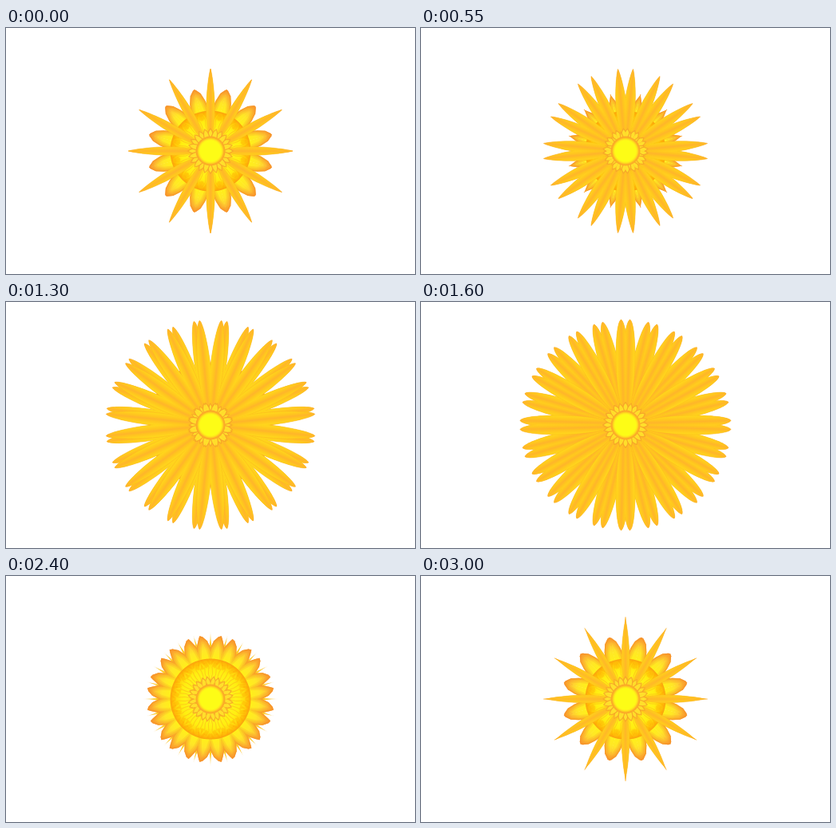
Write an HTML page with a canvas that moves like this. It is 512 px wide and 308 px high and loops after 3.05 s.

```html
<!DOCTYPE html>
<html lang="en">
<head>
<meta charset="utf-8">
<title>Kaleidoscope sun</title>
<style>
  html, body { margin: 0; width: 100%; height: 100%; overflow: hidden; background: #fff; }
  canvas { display: block; }
</style>
</head>
<body>
<canvas id="stage" width="512" height="308"></canvas>
<script>
const ctx = document.getElementById('stage').getContext('2d');
const LOOP = 3050, STEP = 50, TAU = Math.PI * 2;
const SPIN = 30 / LOOP; // degrees per ms: one twelfth of a turn per loop
const rad = deg => deg * Math.PI / 180;
const polar = (r, deg) => [r * Math.cos(rad(deg)), r * Math.sin(rad(deg))];

// Linear interpolation through rows of [time, value, ...]
function track(rows, t) {
  let i = 0;
  while (i < rows.length - 2 && t > rows[i + 1][0]) i++;
  const a = rows[i], b = rows[i + 1];
  const u = Math.min(1, Math.max(0, (t - a[0]) / (b[0] - a[0])));
  return a.slice(1).map((v, k) => v + (b[k + 1] - v) * u);
}

// time, tip angle, length, inner swell, outer swell
const BLADE = [
  [0, 0, 103, 10, 2], [550, 5.3, 103, 13, 2.5], [950, 7.5, 122, 16, 4],
  [1100, 7.5, 131, 15, 5], [1600, 7.5, 132, 11, 9], [2050, 7.5, 132, 9, 9]
];
const COVER = [[0, 1], [1600, 1], [2050, 0.4], [2300, 0], [2500, 0], [2750, 1], [3050, 1]];
// degrees from the tip, radius
const FLAME = [
  [-17, 46], [-13, 55], [-10, 64], [-6.5, 73], [-2.5, 78.5], [0, 80],
  [1.5, 76], [5, 67], [8.5, 54], [11, 46]
];

// Repeats one 15 degree wedge and its mirror image around the centre
function mirror(draw) {
  for (let i = 0; i < 12; i++) {
    for (const side of [1, -1]) {
      ctx.save();
      ctx.rotate(rad(30 * i));
      ctx.scale(1, side);
      ctx.beginPath();
      ctx.moveTo(0, 0);
      ctx.lineTo(...polar(170, -0.2));
      ctx.lineTo(...polar(170, 15.2));
      ctx.closePath();
      ctx.clip();
      draw();
      ctx.restore();
    }
  }
}

function circle(r, fill) {
  ctx.beginPath();
  ctx.arc(0, 0, r, 0, TAU);
  ctx.fillStyle = fill;
  ctx.fill();
}

function radial(r0, r1, stops) {
  const g = ctx.createRadialGradient(0, 0, r0, 0, 0, r1);
  stops.forEach(([at, color]) => g.addColorStop(at, color));
  return g;
}

function blade(base, tip, length, inner, outer) {
  const [x0, y0] = polar(18, base), [x1, y1] = polar(length, tip);
  const len = Math.hypot(x1 - x0, y1 - y0);
  ctx.save();
  ctx.translate(x0, y0);
  ctx.rotate(Math.atan2(y1 - y0, x1 - x0));
  ctx.beginPath();
  ctx.moveTo(0, -1.5);
  ctx.bezierCurveTo(27, -inner, len - 5, -outer, len, 0);
  ctx.bezierCurveTo(len - 5, outer, 27, inner, 0, 1.5);
  ctx.closePath();
  const g = ctx.createLinearGradient(0, -7, 0, 7);
  g.addColorStop(0, '#ffd61c');
  g.addColorStop(0.3, '#ffc51f');
  g.addColorStop(0.5, '#ffb52a');
  g.addColorStop(0.7, '#ffc51f');
  g.addColorStop(1, '#ffd61c');
  ctx.fillStyle = g;
  ctx.fill();
  ctx.lineWidth = 0.7;
  ctx.strokeStyle = 'rgba(248,165,30,.35)';
  ctx.stroke();
  ctx.restore();
}

function blades(t) {
  if (t > 2500) return blade((t - LOOP) * SPIN, (t - LOOP) * SPIN, ...BLADE[0].slice(2));
  const [angle, ...shape] = track(BLADE, t);
  const spread = Math.max(0, t - 1170) * 0.0118;
  blade(angle, angle + spread, ...shape);
  if (spread) blade(angle, angle - spread, ...shape);
}

function flame(angle, fill) {
  const pts = FLAME.map(([d, r]) => polar(r, angle + d));
  ctx.save();
  ctx.beginPath();
  ctx.moveTo(0, 0);
  pts.forEach(p => ctx.lineTo(...p));
  ctx.closePath();
  ctx.fillStyle = fill;
  ctx.fill();
  ctx.clip();
  for (const [width, alpha] of [[12, 0.2], [8, 0.25], [4, 0.4], [1.8, 0.45]]) {
    ctx.lineWidth = width;
    ctx.strokeStyle = `rgba(246,142,40,${alpha})`;
    ctx.stroke();
  }
  ctx.restore();
}

function leaf(angle) {
  ctx.save();
  ctx.rotate(rad(angle));
  ctx.beginPath();
  ctx.moveTo(15, -3);
  ctx.quadraticCurveTo(23, -4.5, 28, 0);
  ctx.quadraticCurveTo(23, 4.5, 15, 3);
  ctx.fillStyle = '#ffdf2b';
  ctx.fill();
  ctx.lineWidth = 1.3;
  ctx.strokeStyle = 'rgba(246,160,40,.8)';
  ctx.stroke();
  ctx.restore();
}

// Soft streaks in the rim and fine filaments inside the disc
function markings(turn) {
  ctx.lineCap = 'round';
  for (let i = 0; i < 10; i++) {
    const a = (i * 3 + turn) % 30;
    const r = 42 + 3 * Math.sin(i * 2.4);
    ctx.beginPath();
    ctx.moveTo(...polar(r, a - 1));
    ctx.lineTo(...polar(r + 4, a + 1.5));
    ctx.lineWidth = 2.5;
    ctx.strokeStyle = 'rgba(255,160,0,.3)';
    ctx.stroke();
  }
  for (let i = -1; i < 4; i++) {
    const a = i * 7.5 + turn % 7.5;
    ctx.beginPath();
    ctx.moveTo(...polar(23, a));
    ctx.quadraticCurveTo(...polar(32, a + 6), ...polar(40, a + 2));
    ctx.lineWidth = 1;
    ctx.strokeStyle = 'rgba(250,165,30,.45)';
    ctx.stroke();
  }
}

function render(t) {
  const turn = t * SPIN;
  const tip = (2 + (t - 1600) * SPIN + 30) % 30;
  const [cover] = track(COVER, t);
  const flameFill = radial(45, 80, [[0, '#fff314'], [0.45, '#ffe726'], [0.75, '#ffc832'], [1, '#f89a30']]);

  ctx.setTransform(1, 0, 0, 1, 0, 0);
  ctx.fillStyle = '#fff';
  ctx.fillRect(0, 0, 512, 308);
  ctx.translate(256, 154);

  mirror(() => blades(t));
  mirror(() => {
    flame(tip, flameFill);
    flame(tip - 30, flameFill);
  });
  circle(50.5, radial(16, 50.5, [
    [0, '#ffdc20'], [0.3, '#fff11a'], [0.6, '#ffee10'],
    [0.8, '#ffd60c'], [0.92, '#ffb808'], [1, '#fba010']
  ]));
  mirror(() => markings(turn));
  if (cover > 0) {
    mirror(() => {
      ctx.globalAlpha = cover;
      blades(t);
    });
  }
  mirror(() => {
    for (const shift of [-15, 0, 15]) leaf(turn % 15 + shift);
  });
  circle(18.5, radial(13, 18.5, [[0, '#fdfc16'], [0.3, '#ffe61c'], [0.7, '#fcae26'], [1, '#fba62a']]));
}

const start = performance.now();
function tick() {
  const t = (performance.now() - start) % LOOP;
  render(Math.floor(t / STEP) * STEP);
  requestAnimationFrame(tick);
}
tick();
</script>
</body>
</html>
```
